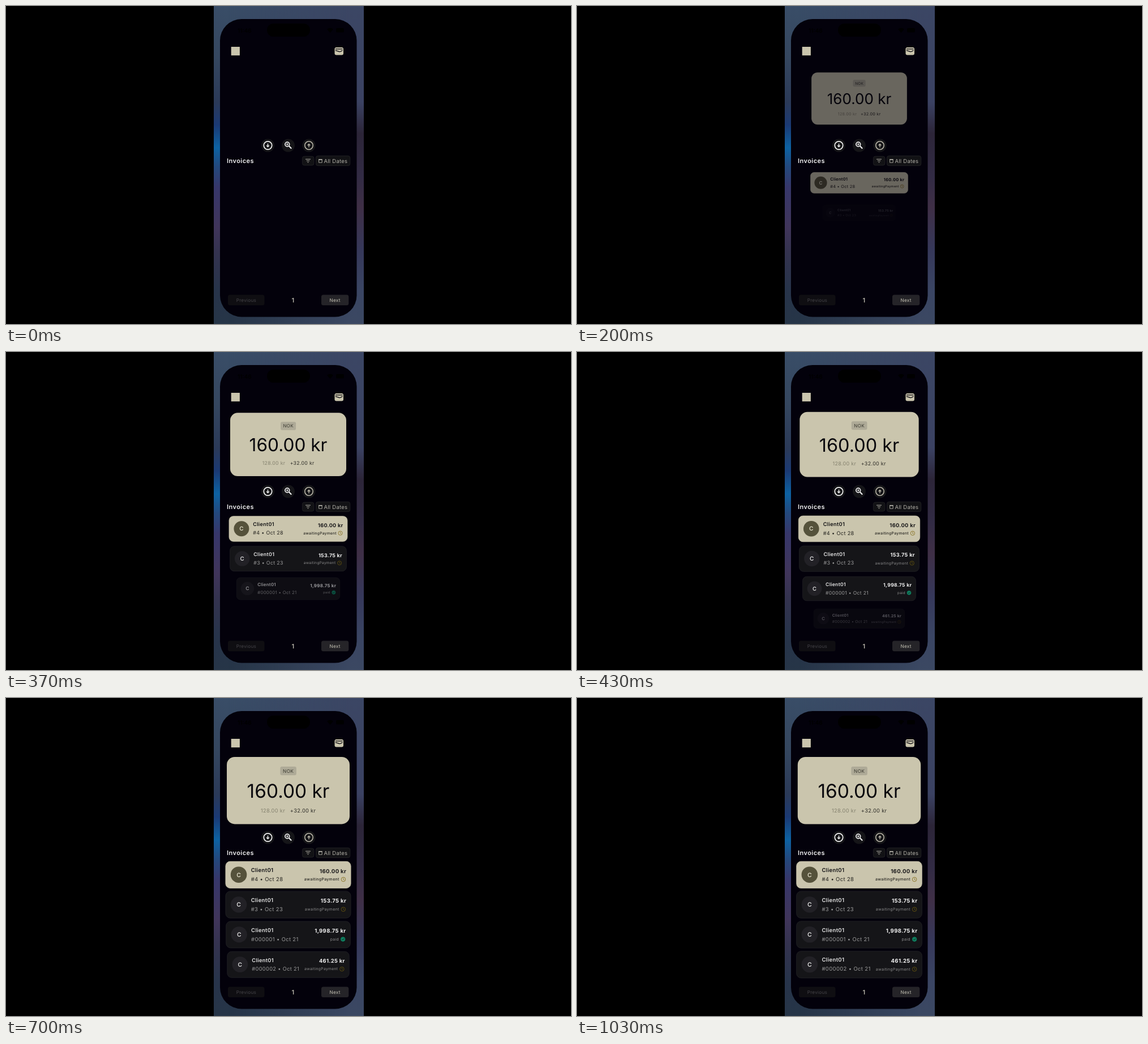
Write an HTML page that moves like this. It is 998 px wide and 561 px high and loops after 1530 ms.

```html
<!DOCTYPE html>
<html lang="en">
<head>
<meta charset="utf-8">
<title>Invoice list</title>
<style>
  html, body { margin: 0; width: 100%; height: 100%; overflow: hidden; background: #000; }
  .wall, .wall::after { position: absolute; top: 0; height: 561px; width: 265px; }
  .wall {
    left: 366.5px;
    background: linear-gradient(#394d67 0, #35475f 90px, #2b3a58 170px, #1b3a74 210px, #0d62a2 250px,
      #24487c 285px, #37376a 320px, #40355a 390px, #34334f 435px, #27344a 500px, #263547 561px);
  }
  .wall::after {
    content: ""; left: 0;
    background: linear-gradient(#3b4664 0, #3b4262 170px, #2c2538 225px, #322b44 300px, #3f2f46 355px,
      #36385a 430px, #3a4563 500px, #3b4862 561px);
    -webkit-mask-image: linear-gradient(90deg, transparent 10%, #000 90%);
    mask-image: linear-gradient(90deg, transparent 10%, #000 90%);
  }
  svg { position: absolute; left: 0; top: 0; }
  text { font-family: Inter, Roboto, sans-serif; text-rendering: geometricPrecision; white-space: pre; }
</style>
</head>
<body>
<div class="wall"></div>
<svg id="stage" width="998" height="561" viewBox="0 0 998 561" fill="none">
  <rect x="378" y="23" width="241.5" height="525.5" rx="38" fill="#03010b"/>
  <g fill="#000">
    <rect x="461" y="31" width="76" height="23" rx="11.5"/>
    <text x="409" y="46.5" font-size="10" font-weight="600">11:46</text>
    <path d="M567 41q5.500-4.500 11 0l-5.500 6z"/>
    <rect x="583" y="39" width="14" height="7.500" rx="2.200"/>
  </g>

  <rect x="397.700" y="72" width="15.200" height="15.200" fill="#cac5ad"/>
  <rect x="580.500" y="73" width="15.500" height="13.500" rx="3" fill="#cac5ad"/>
  <path d="M582 75.800h12.500M582 78.300l7 2.300q1 .3 2-.3l3.500-2" stroke="#03010b" stroke-width="1.300"/>

  <g fill="#151518">
    <circle cx="462.500" cy="246" r="11.500"/>
    <circle cx="498.500" cy="246" r="11.500"/>
    <circle cx="535" cy="246" r="11.500"/>
  </g>
  <g stroke="#f2f2f2" stroke-width="1.700">
    <circle cx="462.500" cy="246" r="7.200"/>
    <path d="M462.500 242.800v5M460.200 246l2.300 2.400 2.300-2.400" stroke-width="1.400"/>
    <circle cx="496.800" cy="244" r="3.900"/>
    <path d="M499.800 247l4.400 4.500" stroke-width="2"/>
    <path d="M494.800 244h4M496.800 242v4" stroke-width="1.200"/>
  </g>
  <g stroke="#b9b5a8" stroke-width="1.600">
    <circle cx="535" cy="246" r="7.200"/>
    <path d="M535 249.200v-5M532.700 246l2.300-2.400 2.300 2.400" stroke-width="1.400"/>
  </g>

  <g fill="#121215" stroke="#252528" stroke-width=".8">
    <rect x="523.400" y="265.200" width="20.600" height="15.800" rx="3.500"/>
    <rect x="547.400" y="264.400" width="60.400" height="17.300" rx="3.500"/>
  </g>
  <path d="M529 270.300h9M530.700 273h5.600M532.400 275.700h2.200" stroke="#b5b3aa" stroke-width="1.100"/>
  <path d="M552.600 271h5.600v5.200h-5.600z" stroke="#b5b3aa" stroke-width=".9"/>
  <path d="M552.200 270.800h6.400" stroke="#b5b3aa" stroke-width="1.500"/>
  <rect x="392" y="509.500" width="64.500" height="18.500" rx="3.500" fill="#0f0e12"/>
  <rect x="557" y="509.500" width="48.300" height="18.500" rx="3.500" fill="#252428"/>
</svg>
<script>
const LOOP = 1530, CX = 498.5, CREAM = '#cac5ad';
const stage = document.getElementById('stage');

// Entrance curves: [ms since the item's clock started, value]
const SCALE = [[130, .35], [170, .572], [186, .725], [200, .775], [270, .857], [300, .901], [350, .934],
  [400, .955], [430, .967], [530, .986], [620, .996], [780, 1]];
const FADE = [[130, 0], [160, .05], [170, .12], [185, .34], [200, .51], [270, .71], [300, 1]];

function along(curve, t) {
  const i = curve.findIndex(k => k[0] > t);
  if (i < 0) return curve[curve.length - 1][1];
  if (i === 0) return curve[0][1];
  const [t0, a] = curve[i - 1], [t1, b] = curve[i];
  return a + (b - a) * (t - t0) / (t1 - t0);
}

function add(parent, tag, attrs, content = '') {
  const el = document.createElementNS('http://www.w3.org/2000/svg', tag);
  for (const name in attrs) el.setAttribute(name, attrs[name]);
  el.textContent = content;
  return parent.appendChild(el);
}

function label(parent, content, x, y, size, fill, weight = 400, spacing = 0, anchor = 'start') {
  const shift = { start: 0, middle: spacing / 2, end: spacing }[anchor];
  add(parent, 'text', { x: x + shift, y, fill, 'font-size': size, 'font-weight': weight,
    'letter-spacing': spacing, 'text-anchor': anchor }, content);
}

const items = [];
// A group drawn around its own centre, so it can scale in place
function item(y, delay) {
  const el = add(stage, 'g', {});
  items.push({ el, y, delay });
  return el;
}

function balanceCard() {
  const g = item(163.2, 0);
  add(g, 'rect', { x: -108.7, y: -59.3, width: 217.4, height: 118.6, rx: 14, fill: CREAM });
  add(g, 'rect', { x: -14.2, y: -42.3, width: 28.6, height: 15.4, rx: 3, fill: '#aeaa97' });
  label(g, 'NOK', 0, -31.6, 8.4, '#3a3930', 400, .3, 'middle');
  label(g, '160.00 kr', 0, 12.8, 33.5, '#08070c', 400, 0, 'middle');
  label(g, '128.00 kr', -48.6, 38.4, 9.3, '#85826f', 400, .3);
  label(g, '+32.00 kr', 48.6, 38.4, 9.3, '#2d2c27', 400, .3, 'end');
}

function invoiceRow(index, delay, date, amount, paid) {
  const first = index === 0;
  const pick = (light, dark) => first ? light : dark;
  const g = item(311.9 + index * 52.8, delay);
  add(g, 'rect', { x: -110.8, y: -23.6, width: 221.6, height: 47.2, rx: 8,
    fill: pick(CREAM, '#151518'), stroke: pick(CREAM, '#242428'), 'stroke-width': .8 });
  add(g, 'circle', { cx: -87.6, cy: -.2, r: 14.3, fill: pick('#55523b', '#222126') });
  label(g, 'C', -87.6, 3.6, 10.5, pick('#dcd8c4', '#dcdcdc'), 600, 0, 'middle');
  label(g, 'Client01', -66, -4.9, 9.6, pick('#121214', '#e4e4e4'), 600, .3);
  label(g, date, -66, 11.2, 9.5, pick('#24231f', '#9b9b9b'), 400, .35);
  label(g, amount, 102.6, -3.4, 9.6, pick('#19181a', '#f0f0f0'), 700, .35, 'end');
  label(g, paid ? 'paid' : 'awaitingPayment', 90.1, 10.4, 7, pick('#24231f', '#8c8c8c'),
    pick(500, 400), .3, 'end');
  const tone = paid ? '#0f7f5f' : pick('#87701f', '#655410');
  add(g, 'circle', { cx: 97.6, cy: 8.1, r: 3.8, fill: paid ? tone : 'none', stroke: tone, 'stroke-width': .9 });
  add(g, 'path', { d: paid ? 'M95.700 8.200l1.400 1.400 2.600-2.800' : 'M97.600 5.800v2.500l1.700 1',
    stroke: paid ? '#10181a' : tone, 'stroke-width': .9 });
}

label(stage, 'Invoices', 390, 277, 11, '#f2f2f2', 600, .45);
label(stage, 'All Dates', 561.5, 276.6, 9.5, '#b0aea6', 400, .25);
label(stage, 'Previous', 424.3, 522, 8.2, '#454449', 400, .25, 'middle');
label(stage, '1', 506.8, 523, 11, '#b9b6aa', 600, 0, 'middle');
label(stage, 'Next', 581, 522, 8.2, '#c6c3b6', 400, .25, 'middle');

balanceCard();
invoiceRow(0, 0, '#4 • Oct 28', '160.00 kr');
invoiceRow(1, 30, '#3 • Oct 23', '153.75 kr');
invoiceRow(2, 130, '#000001 • Oct 21', '1,998.75 kr', true);
invoiceRow(3, 245, '#000002 • Oct 21', '461.25 kr');

const start = performance.now();
function draw() {
  const t = (performance.now() - start) % LOOP;
  for (const { el, y, delay } of items) {
    el.setAttribute('transform', `translate(${CX} ${y}) scale(${along(SCALE, t - delay)})`);
    el.setAttribute('opacity', along(FADE, t - delay));
  }
  requestAnimationFrame(draw);
}
draw();
</script>
</body>
</html>
```
